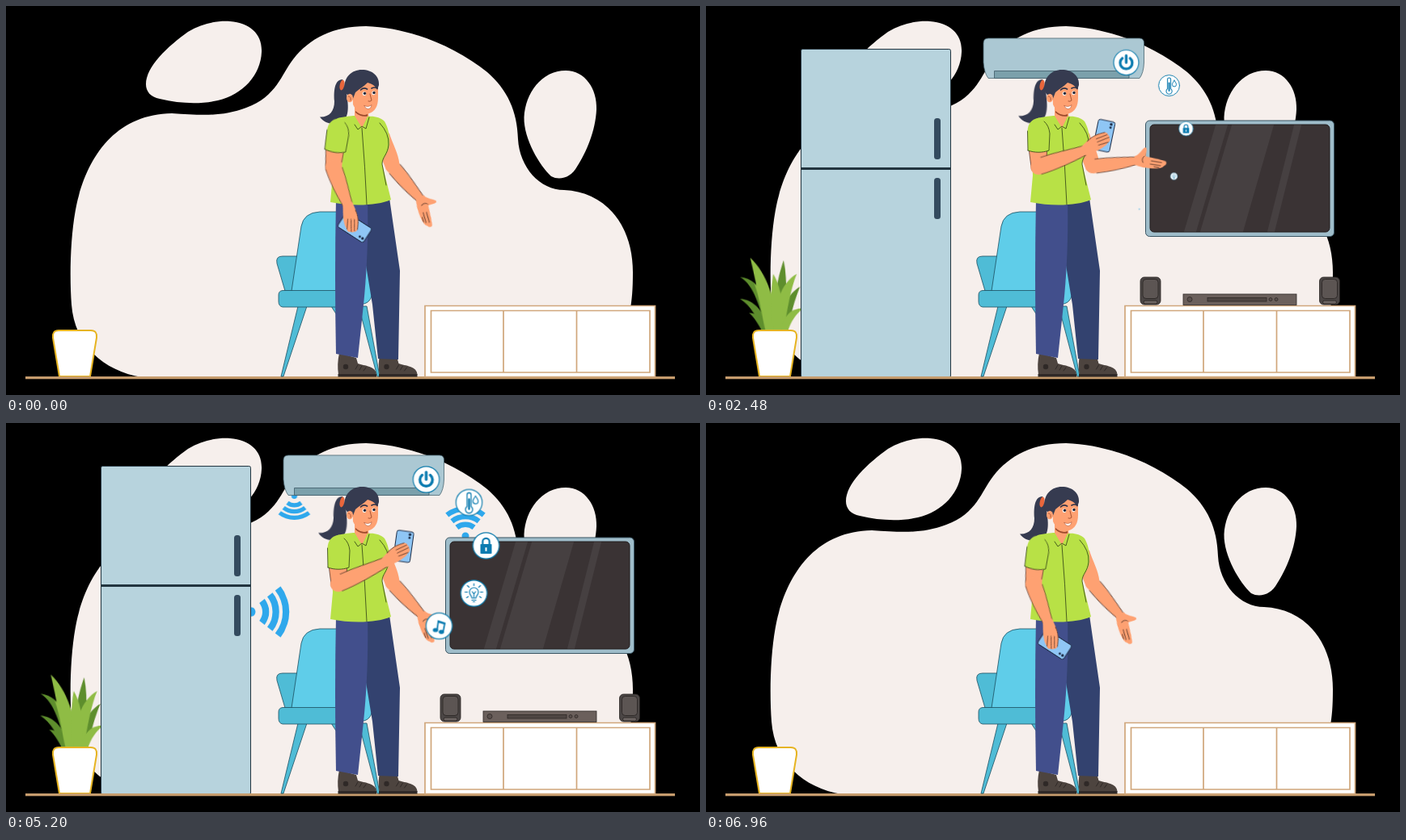
An HTML page that plays this animation: 858 px wide and 482 px high, repeating every 7.04 s.

```html
<!DOCTYPE html>
<html lang="en">
<head>
<meta charset="utf-8">
<title>Smart home</title>
<style>
html, body { margin: 0; width: 100%; height: 100%; overflow: hidden; background: #000; }
svg { display: block; width: 100vw; height: 100vh; }

.anim { animation: 7.04s ease-in-out infinite both; }
.early { animation-name: early; }
.fridge { transform-origin: 210px 460px; }
.cooler { transform-origin: 442px 64px; }
.leaves { transform-origin: 85px 402px; }
.sway { animation-name: sway; transform-origin: 85px 402px; }
.tv { animation-name: tv; transform-origin: 660px 213.5px; }
.hifi { animation-name: hifi; transform-origin: 660px 371px; }
.wifi { animation-name: wifi; }
.pop { animation-name: pop; }
.bob { animation-name: bob; }
.tail { animation-name: tail; transform-origin: 417px 97px; }
.eyes { animation-name: blink; transform-origin: 448px 108px; }
.r-fore { animation-name: r-fore; }
.r-hand { animation-name: r-hand; }
.l-upper { animation-name: l-upper; transform-origin: 408px 150px; }
.l-fore { animation-name: l-fore; }
.l-skin { animation-name: l-skin; }
.l-hand { animation-name: l-hand; }
.ray, .ring { stroke-dasharray: 100 100; }
.ray { animation-name: ray; }
.ring { animation-name: ring; }

@keyframes early {
  0%, 1.14% { transform: scale(0); animation-timing-function: cubic-bezier(.5,1,.89,1); }
  11.7%, 89.5% { transform: none; animation-timing-function: cubic-bezier(.11,0,.5,0); }
  98.6%, 100% { transform: scale(0); }
}
@keyframes tv {
  0%, 7.6% { transform: scale(0); animation-timing-function: cubic-bezier(.5,1,.89,1); }
  18.2%, 90.5% { transform: none; animation-timing-function: cubic-bezier(.11,0,.5,0); }
  97.7%, 100% { transform: scale(0); }
}
@keyframes hifi {
  0%, 10.1% { transform: scale(0); animation-timing-function: cubic-bezier(.5,1,.89,1); }
  27.8%, 85.5% { transform: none; animation-timing-function: cubic-bezier(.11,0,.5,0); }
  93%, 100% { transform: scale(0); }
}
@keyframes wifi {
  0%, 9% { transform: scale(0); opacity: 1; }
  10.23% { transform: scale(.2); }
  17%, 28% { transform: none; opacity: 1; }
  34%, 60.5% { transform: scale(0); opacity: .7; }
  63.64% { transform: scale(.58); opacity: .88; }
  68%, 77% { transform: none; opacity: 1; }
  83%, 100% { transform: scale(0); opacity: 1; }
}
@keyframes pop {
  0%, 30.8% { transform: scale(0); }
  36%, 61% { transform: none; }
  63.64% { transform: scale(1.05); }
  66.5%, 86% { transform: none; }
  91%, 100% { transform: scale(0); }
}
@keyframes sway {
  0% { transform: rotate(0deg); }
  10.23% { transform: rotate(-4.5deg); }
  22.7% { transform: rotate(0deg); }
  36% { transform: rotate(-4deg); }
  48.9% { transform: rotate(-8deg); }
  63.64% { transform: rotate(-1.5deg); }
  85.2% { transform: rotate(-6deg); }
  100% { transform: rotate(0deg); }
}
@keyframes bob {
  0%, 20.5%, 100% { transform: none; }
  10.23% { transform: translate(1px, 3.5px); }
}
@keyframes tail {
  0%, 10.23%, 85.2%, 100% { transform: none; }
  22.7% { transform: rotate(2deg); }
  63.64% { transform: rotate(5deg); }
}
@keyframes blink {
  0%, 21%, 24.5%, 100% { transform: none; }
  22%, 23.4% { transform: scaleY(.15); }
}
@keyframes r-fore {
  0%, 100% { transform: rotate(49deg); animation-timing-function: ease-in; }
  10.23% { transform: rotate(29deg); animation-timing-function: ease-out; }
  20.5%, 39.8% { transform: rotate(-8deg); animation-timing-function: ease-in; }
  48.9% { transform: rotate(13deg); animation-timing-function: ease-out; }
  60% { transform: rotate(45deg); }
  85.2% { transform: rotate(48deg); }
}
@keyframes r-hand {
  0%, 60%, 100% { transform: translate(53px, 0) rotate(21deg); }
  20.5%, 39.8% { transform: translate(55px, 0) rotate(13deg); }
}
@keyframes l-upper {
  0%, 92.5%, 100% { transform: rotate(8deg); }
  10.23%, 76% { transform: none; }
  85.2% { transform: rotate(3deg); }
}
@keyframes l-fore {
  0%, 92.5%, 100% { transform: rotate(61deg); animation-timing-function: ease-in; }
  10.23% { transform: rotate(33deg); animation-timing-function: ease-out; }
  20.5%, 28% { transform: rotate(-18deg); animation-timing-function: ease-in-out; }
  48.9%, 76% { transform: rotate(-25deg); animation-timing-function: ease-in; }
  85.2% { transform: rotate(35deg); animation-timing-function: ease-out; }
}
@keyframes l-skin {
  0%, 92.5%, 100% { transform: scaleX(.85); }
  10.23% { transform: scaleX(.95); }
  20.5%, 28%, 85.2% { transform: none; }
  48.9%, 76% { transform: scaleX(1.07); }
}
@keyframes l-hand {
  0%, 92.5%, 100% { transform: translate(51px, 0) rotate(-36deg); }
  10.23% { transform: translate(57px, 0) rotate(-42deg); }
  20.5%, 28% { transform: translate(60px, 0) rotate(-54deg); }
  48.9% { transform: translate(64px, 0) rotate(-72deg); }
  63.64%, 76% { transform: translate(64px, 0) rotate(-57deg); }
  85.2% { transform: translate(59px, 0) rotate(-42deg); }
}
@keyframes ray {
  0%, 38% { stroke-dashoffset: 100; }
  47%, 57% { stroke-dashoffset: 0; }
  63.64% { stroke-dashoffset: 62; }
  69%, 100% { stroke-dashoffset: 100; }
}
@keyframes ring {
  0%, 39% { stroke-dashoffset: 100; }
  48.9% { stroke-dashoffset: 12; }
  53%, 57% { stroke-dashoffset: 0; }
  63.64% { stroke-dashoffset: -42; }
  70%, 100% { stroke-dashoffset: -100; }
}
</style>
</head>
<body>
<svg viewBox="0 0 858 482" preserveAspectRatio="none">
<defs>
  <g id="waves" fill="none" stroke="#2fa8ec" stroke-width="6.500">
    <path d="M-22.700 -29A36.800 36.800 0 0 1 22.700 -29M-16.600 -21.300A27 27 0 0 1 16.600 -21.300M-10.600 -13.600A17.200 17.200 0 0 1 10.600 -13.600"/>
    <circle cy="-3" r="4.500" fill="#2fa8ec" stroke="none"/>
  </g>
  <g id="speaker" stroke="#262120" stroke-width=".8">
    <rect x="537" y="336" width="25" height="34" rx="5" fill="#4b4645"/>
    <rect x="540" y="338.500" width="19" height="24" rx="4" fill="#5c5553"/>
    <rect x="541" y="365" width="17" height="4" rx="2" fill="#6b6361"/>
  </g>
  <g id="shoe">
    <path d="M412 430L433 436L435 443C443 446 458 446 458 457L411 457Q409 444 412 430Z" fill="#4d443f"/>
    <path d="M410.500 456H458V459.500H410.500Z" fill="#2f2927"/>
    <circle cx="420" cy="447" r="3.200" fill="#2f2927"/>
    <path d="M435 445L432 450M440 446L437 451M445 448L442 452" stroke="#2f2927" fill="none"/>
  </g>
  <circle id="disc" r="16.200" fill="#fff" stroke="#0d7bab" stroke-width="1.200"/>
  <mask id="reveal" maskUnits="userSpaceOnUse" x="0" y="0" width="858" height="482">
    <g fill="none" stroke="#fff" stroke-width="6">
      <path class="anim ray" pathLength="100" d="M495 134L499 122"/>
      <path class="anim ray" pathLength="100" d="M503 138L559 106"/>
      <path class="anim ray" pathLength="100" d="M578 150L503 147.500"/>
      <path class="anim ray" pathLength="100" d="M503 160L566 200"/>
      <path class="anim ray" pathLength="100" d="M499 174L528 237"/>
      <path class="anim ring" pathLength="100" d="M572 99A90 90 0 0 1 593 152A90 90 0 0 1 578 211A90 90 0 0 1 535 251"/>
    </g>
  </mask>
</defs>

<rect width="858" height="482"/>
<g fill="#f6efec">
  <path d="M168 460C120 452 85 420 81 370C78 330 80 270 90 235C105 180 140 134 205 133C240 135 265 138 297 126C335 112 340 85 355 66C375 40 405 25 445 25C500 27 555 50 595 82C620 104 632 130 633 165C635 200 660 228 690 228C740 230 775 270 775 330C775 350 774 365 771 380L760 460Z"/>
  <path d="M173 97C173 75 200 50 225 32C243 21 262 18 277 19C302 21 317 35 316 57C315 85 293 110 262 117C240 122 215 121 190 115C179 113 173 106 173 97Z"/>
  <path d="M692 80C716 80 731 103 730 128C729 155 717 182 706 199C699 212 685 217 674 211C660 198 640 165 640.500 138C642 108 662 80 692 80Z"/>
</g>

<!-- plant -->
<g class="anim early leaves"><g class="anim sway">
  <g fill="#5e8e2d">
    <path d="M84 404C82 370 74 338 47 333C64 345 68 372 76 404Z"/>
    <path d="M86 404C84 370 92 340 102 316C106 345 100 375 95 404Z"/>
    <path d="M80 404C74 378 62 362 45 360C58 370 64 384 71 404Z"/>
    <path d="M92 404C96 374 104 358 120 350C112 366 106 384 101 404Z"/>
    <path d="M79 404C72 390 68 380 55 378C62 386 66 394 70 404Z"/>
  </g>
  <g fill="#8fbc45">
    <path d="M89 404C89 365 80 330 61 310C66 340 69 370 77 404Z"/>
    <path d="M85 404C86 372 96 344 117 334C108 352 102 378 96 404Z"/>
    <path d="M84 404C84 376 80 356 64 343C70 364 70 382 74 404Z"/>
    <path d="M92 404C98 384 106 376 122 377C112 384 106 392 101 404Z"/>
    <path d="M84 404C80 376 84 350 88 332C98 352 98 380 93 404Z"/>
  </g>
</g></g>
<path d="M66 459L58 411Q57 402 65 402H105Q113 402 112 411L104 459Z" fill="#fff" stroke="#e6b422" stroke-width="2"/>

<!-- fridge -->
<g class="anim early fridge">
  <g transform="translate(299 234) rotate(90) scale(1.28)"><use href="#waves" class="anim wifi"/></g>
  <g fill="#b7d3dd" stroke="#22343f">
    <rect x="117.500" y="53.500" width="185" height="406.500" rx="2"/>
    <path d="M117.500 201.500H302.500" stroke-width="3"/>
  </g>
  <g fill="#344b5f">
    <rect x="282" y="139" width="8" height="51" rx="3.500"/>
    <rect x="282" y="213" width="8" height="51" rx="3.500"/>
  </g>
</g>

<!-- air conditioner -->
<g class="anim early cooler">
  <g transform="translate(356.500 88) rotate(180) scale(.8)"><use href="#waves" class="anim wifi"/></g>
  <path d="M349 40H536Q541.500 40 541.500 46V70Q541 83 536 89.500H349Q344 83 343 70V46Q343 40 349 40Z" fill="#abc8d3" stroke="#4a6570" stroke-width=".8"/>
  <path d="M356.500 80.500H523V89.500H356.500Z" fill="#7ba0ab" stroke="#3d5a66" stroke-width=".8"/>
</g>

<!-- television -->
<g class="anim tv">
  <g transform="translate(568 143)"><use href="#waves" class="anim wifi"/></g>
  <rect x="543.500" y="142" width="233" height="143.500" rx="5" fill="#9fbdca" stroke="#3a5563"/>
  <rect x="549" y="147" width="222" height="133" rx="5" fill="#3a3334" stroke="#221c1d"/>
  <path d="M591 279.500L630 147.500H645L606 279.500ZM611 279.500L650 147.500H702L664 279.500ZM694 279.500L727 147.500H736L703 279.500Z" fill="#464041"/>
</g>

<path d="M24 460.700H827" stroke="#c69c6d" stroke-width="3.200"/>
<g fill="#fff" stroke="#d0a67b" stroke-width="1.700">
  <path d="M518 371.500H802.500V459.500H518Z"/>
  <path d="M525.500 377.500H796V454H525.500ZM615 377.500V454M705.500 377.500V454"/>
</g>

<g class="anim hifi">
  <use href="#speaker"/>
  <use href="#speaker" x="221.500"/>
  <g stroke="#2e2826" stroke-width=".8">
    <rect x="590" y="357" width="140" height="13.500" fill="#6b605c"/>
    <rect x="620" y="361.500" width="73" height="4.500" fill="#4f4643"/>
    <g fill="#5a504d"><circle cx="598" cy="363.500" r="3"/><circle cx="698" cy="363.500" r="2"/><circle cx="705" cy="363.500" r="2"/></g>
  </g>
</g>

<!-- chair -->
<g stroke="#1c4f60" stroke-width=".8" fill="#4fbcd6">
  <path d="M361 372H372L343 459H340Z"/>
  <path d="M436 372H446L462 459H459Z"/>
  <path d="M402 372H412L420 400Z"/>
  <path d="M345 353L335 319Q333 310 342 310H362L355 353Z"/>
  <path d="M353 353L365 273Q368 256 388 255H425Q443 256 446 275L453 352Q453 366 443 369Z" fill="#5fcde9"/>
  <path d="M342 352.500H440V373H342Q337 372 337 366V358Q337 353 342 352.500Z"/>
</g>

<!-- woman -->
<g stroke-linecap="round" stroke-linejoin="round">
  <g class="anim bob" fill="#fea172">
    <path d="M462 150L474 158C478 171 485 182 486.500 196C486 205 477 210 470 203L463 185Z"/>
    <g transform="translate(478 199)"><g class="anim r-fore">
      <path d="M0 -8.500C20 -9 40 -6 55 -4.500V5C35 8 15 9 0 8.500A8.500 8.500 0 0 1 0 -8.500Z"/>
      <path d="M4 -8.800C20 -9 40 -6 53 -4.700M4 8.700C20 9 36 8 53 5.200" fill="none" stroke="#4a2c22" stroke-width=".7"/>
      <g class="anim r-hand">
        <path d="M-3 -5C3 -7 6 -16 9 -17C13 -17 10 -9 11 -6C18 -5 28 -4 36 -2C38 1 36 3 34 4C32 8 20 9 12 8C6 8 0 6 -3 5Z"/>
        <path d="M18 -1L31 0M17 3L30 4M9 -6Q5 -3 8 2M22 6L28 6.500" fill="none" stroke="#4a2c22" stroke-width=".8"/>
      </g>
    </g></g>
  </g>

  <use href="#shoe"/>
  <use href="#shoe" x="50.500"/>
  <path d="M440 240L474 238L487 328L485 438L460 437L453 370L444 315Z" fill="#33426f"/>
  <path d="M408 240H447C448 290 446 330 442 370L435 436L408 431Q406 335 408 240Z" fill="#424f8c"/>

  <g class="anim bob">
    <path class="anim tail" d="M416 91C406 91 405 106 406 118C406 130 400 138 388 137.500C394 146 406 148 414 144C424 140 424 126 421 108Z" fill="#363b50"/>
    <path d="M431 115L431 140L440 154L449 140L447 125Z" fill="#fea172"/>
    <path d="M432 130Q440 137 447 134V136.500Q438 138 432 132Z" fill="#9c4a2c"/>
    <path d="M410 139C418 137 427 136 431 136L440 151L447 137C455 136 463 138 468 143C472 150 475 160 474 172C473 184 465 187 465 196L476 240C460 247 430 249 401 243L404 210L402 150Z" fill="#b8e146"/>
    <path d="M440 151Q444 200 446 246M431 147L435 153L440 149L445 152L449 138M462 145Q474 158 473 172C472 184 465 187 465 196L470 222" fill="none" stroke="#2d3d14" stroke-width=".8"/>

    <ellipse cx="415.500" cy="98" rx="2.800" ry="6.500" transform="rotate(12 415.500 98)" fill="#e8663c"/>
    <path d="M428 100L429 122C433 131 441 135 449 133C456 131 460 124 460 114V98C455 90 440 88 428 100Z" fill="#fea172"/>
    <path d="M418 103C418 88 427 79 440 79C453 79 462 87 461 98L459 104C457 99 452 96 447 95C442 100 436 103 432 107L428.500 116L422 110Q418 106 418 103Z" fill="#363b50"/>
    <ellipse cx="425" cy="114" rx="4" ry="5.200" fill="#fea172"/>
    <path d="M423.500 112Q427 112 426 117" fill="none" stroke="#9c4a2c" stroke-width=".8"/>
    <path d="M438.500 104Q442 100.500 446.500 103M452 102Q455.500 100 459 102" fill="none" stroke="#2f3347" stroke-width="1.700"/>
    <g class="anim eyes">
      <g fill="#fff"><ellipse cx="443" cy="108.500" rx="2.300" ry="2.500"/><ellipse cx="454.500" cy="107.700" rx="2.200" ry="2.500"/></g>
      <g fill="#232638"><circle cx="443.500" cy="108.300" r="1.700"/><circle cx="455" cy="107.500" r="1.700"/></g>
    </g>
    <path d="M450 109L452 117Q450 119 448 118" fill="none" stroke="#9c4a2c" stroke-width=".9"/>
    <path d="M443 123.500Q448 126 452 122.500Q451 128 447 127.500Q444 127 443 123.500Z" fill="#fff" stroke="#b3532f" stroke-width=".6"/>

    <g class="anim l-upper">
      <path d="M398 165L421 168L422 200C420 210 404 212 402 202Z" fill="#fea172"/>
      <path d="M399.500 180L402.500 203M421.500 180L421 192" fill="none" stroke="#4a2c22" stroke-width=".7"/>
      <g transform="translate(411.500 199)"><g class="anim l-fore">
        <path class="anim l-skin" d="M0 -10C20 -10 42 -7 61 -5.500V6C40 9 18 11 0 10A10 10 0 0 1 0 -10Z" fill="#fea172"/>
        <path class="anim l-skin" d="M6 -10C22 -10 42 -7 59 -5.700M0 10C18 11 40 9 59 6.200" fill="none" stroke="#4a2c22" stroke-width=".7"/>
        <g class="anim l-hand">
          <rect x="3" y="8.500" width="38" height="21" rx="2.500" fill="#8fc6f5" stroke="#1c2b45"/>
          <g fill="#1c2b45"><circle cx="33.500" cy="25" r="1.400"/><circle cx="37.500" cy="25" r="1.700"/></g>
          <g transform="rotate(45)">
            <path d="M-3 -5.500C6 -8 16 -10 24 -8L32 -5Q35 -3 34 0Q35 2 33 4Q33 8 28 8C22 11 12 9 -3 6Z" fill="#fea172"/>
            <path d="M19 -4L33 -1M18 0L33 3M17 4L29 7.500M8 -7.500C16 -10 24 -8 32 -5" fill="none" stroke="#4a2c22" stroke-width=".8"/>
          </g>
        </g>
      </g></g>
      <path d="M412 138.500C402 140 398 146 397.500 155L398 179C406 182 416 182 424 179L425 158Q424 145 412 138.500Z" fill="#b8e146"/>
      <path d="M398 179C406 182 416 182 424 179L425 158Q424 148 418 143M397.500 155L398 179" fill="none" stroke="#2d3d14" stroke-width=".8"/>
    </g>
  </g>
</g>

<!-- controls -->
<g mask="url(#reveal)">
  <path d="M495 134L499 122M503 138L559 106M578 150L503 147.500M503 160L566 200M499 174L528 237M572 99A90 90 0 0 1 593 152A90 90 0 0 1 578 211A90 90 0 0 1 535 251" fill="none" stroke="#0e7fae" stroke-width="1.500" stroke-dasharray="5 4"/>
</g>
<g fill="none" stroke="#0b7bb0" stroke-linecap="round">
  <g transform="translate(519.500 70)"><g class="anim pop">
    <use href="#disc"/>
    <path d="M-5 -5.500A7.800 7.800 0 1 0 5 -5.500M0 -9V0" stroke-width="3.400"/>
  </g></g>
  <g transform="translate(572.500 98.500)"><g class="anim pop" style="animation-delay:.06s">
    <use href="#disc"/>
    <path d="M-2.500 5V-9.500A2.500 2.500 0 0 1 2.500 -9.500V5A4.500 4.500 0 1 1 -2.500 5Z" stroke-width="1.300"/>
    <path d="M0 -4V8" stroke-width="2.400"/>
    <path d="M8 -8Q4.500 -3 4.800 -1.500A3.200 3.200 0 0 0 11.200 -1.500Q11.500 -3 8 -8Z" stroke-width="1.200"/>
  </g></g>
  <g transform="translate(593.500 152)"><g class="anim pop" style="animation-delay:.12s">
    <use href="#disc"/>
    <path d="M-4.200 -1V-5A4.200 4.200 0 0 1 4.200 -5V-1" stroke-width="2.200"/>
    <rect x="-7" y="-2" width="14" height="12" rx="1" fill="#0b7bb0" stroke="none"/>
    <path d="M0 3V6" stroke="#fff" stroke-width="2"/>
  </g></g>
  <g transform="translate(578.500 211)"><g class="anim pop" style="animation-delay:.18s">
    <use href="#disc"/>
    <path d="M-2.500 6C-2.500 3 -5.500 2 -5.500 -1.500A5.500 5.500 0 0 1 5.500 -1.500C5.500 2 2.500 3 2.500 6ZM-2.500 8.500H2.500M-1 10.500H1M0 6V1L-2 -2M0 1L2 -2" stroke-width="1.200"/>
    <path d="M0 -9.500V-12M-6 -7.500L-8 -9.500M6 -7.500L8 -9.500M-8 -1.500H-11M8 -1.500H11M-7 4L-9 5.500M7 4L9 5.500" stroke-width="1.200"/>
  </g></g>
  <g transform="translate(535.500 251.500)"><g class="anim pop" style="animation-delay:.24s">
    <use href="#disc"/>
    <path d="M-2.500 5L-1 -6L7 -3.500L5 7M-1 -5L7 -2.500" stroke-width="1.800"/>
    <g fill="#0b7bb0" stroke="none"><ellipse cx="-4.500" cy="5" rx="3.300" ry="2.600"/><ellipse cx="2.800" cy="7.300" rx="3.300" ry="2.600"/></g>
  </g></g>
</g>
</svg>
</body>
</html>
```
